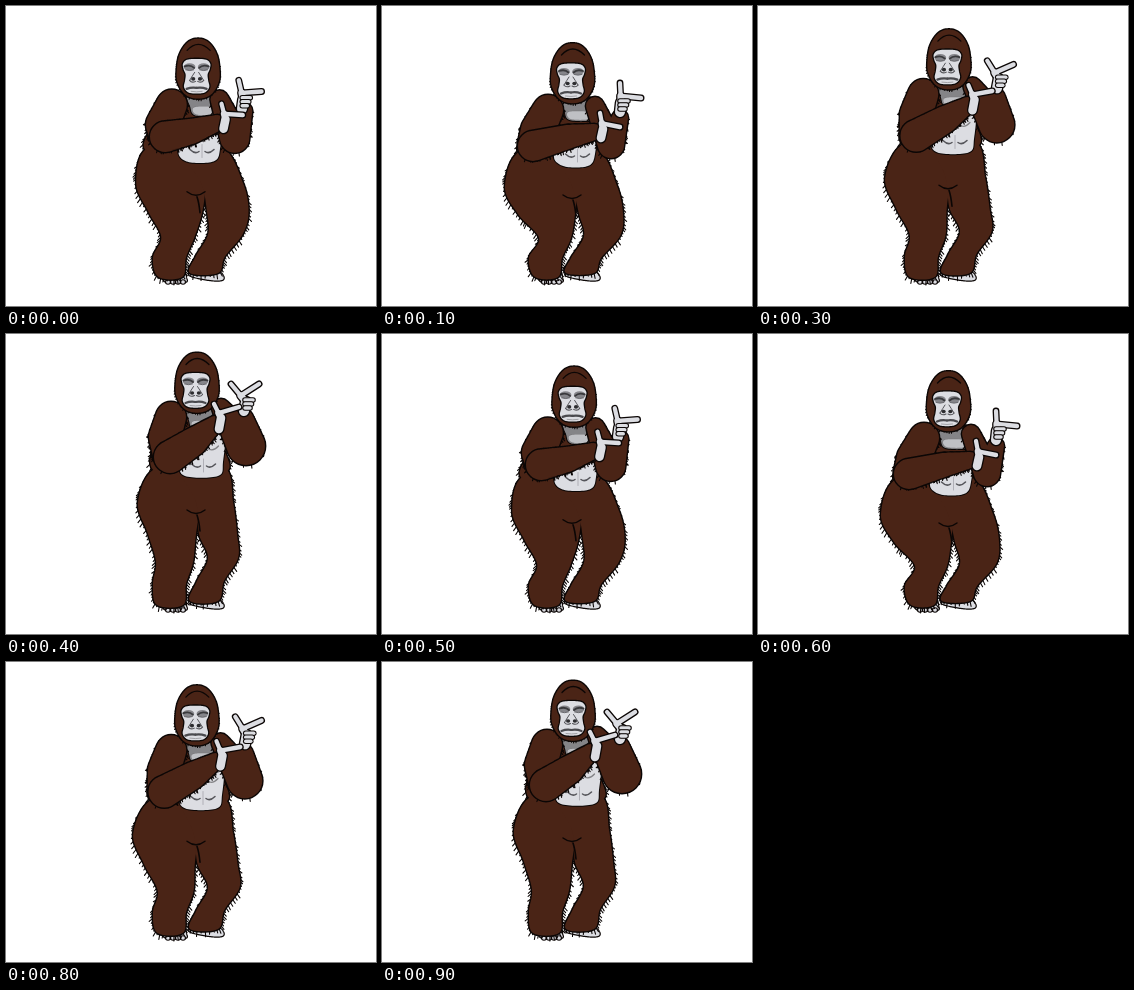
An HTML page with a canvas that plays this animation: 370x300 px, repeating every 1000 ms.

```html
<!DOCTYPE html>
<html lang="en">
<head>
<meta charset="utf-8">
<title>Dancing gorilla</title>
<style>
html, body { margin: 0; width: 100%; height: 100%; overflow: hidden; background: #fff; }
canvas { display: block; }
</style>
</head>
<body>
<canvas id="stage" width="370" height="300"></canvas>
<script>
const ctx = document.getElementById('stage').getContext('2d');
const FUR = '#4a2416', SKIN = '#dcdde2', GRAY = '#848487', SHADE = '#55555a', INK = '#0b0605';
const STEP = 100;

// Every beat is a mix of a crouch and a stretch, plus a sideways sway of the hips and elbows.
const LIFT = [.25, 0, .5, .75, 1];
const SWAY = [1, 0, -1, -.5, 0];

// Trunk parts are spans [y, left, right]; arms are joints [x, y, radius].
const crouch = {
  torso: [[94, 172, 211], [118, 150, 214], [148, 139, 216]],
  legL: [[144, 140, 200], [180, 123, 196], [208, 136, 193], [232, 157, 189], [252, 147, 180], [271, 153, 176]],
  legR: [[144, 175, 216], [180, 190, 235], [208, 197, 241], [230, 202, 238], [252, 189, 219], [267, 184, 212]],
  chest: [[125, 190, 212], [148, 172, 213], [160, 181, 206]],
  upper: [[166, 104, 15], [156, 124, 17], [152, 138, 16]],
  fore: [[151, 140, 15], [185, 131, 12], [212, 126, 8]],
  far: [[213, 100, 9], [229, 139, 13], [238, 112, 8]],
  hand: [[221, 123], [219, 132], [218, 107], [238, 121]],
  fist: [[239, 97], [238, 106], [238, 77], [259, 92]]
};
const stretch = {
  torso: [[72, 172, 210], [104, 151, 213], [138, 150, 220]],
  legL: [[134, 150, 200], [168, 132, 195], [200, 142, 190], [228, 150, 187], [250, 147, 180], [271, 151, 177]],
  legR: [[134, 175, 219], [168, 190, 227], [200, 193, 231], [224, 202, 232], [247, 191, 218], [267, 184, 212]],
  chest: [[95, 190, 217], [128, 175, 217], [142, 179, 212]],
  upper: [[165, 83, 15], [159, 103, 16], [163, 120, 16]],
  fore: [[164, 123, 16], [187, 108, 14], [209, 90, 8]],
  far: [[215, 74, 9], [240, 112, 19], [239, 84, 8]],
  hand: [[215, 84], [213, 95], [208, 70], [233, 73]],
  fist: [[240, 68], [238, 77], [225, 50], [253, 50]]
};

const mix = (a, b, k) => Array.isArray(a) ? a.map((v, i) => mix(v, b[i], k)) : a + (b - a) * k;
const noise = n => { const s = Math.sin(n * 127.1 + 3.7) * 43758.5453; return s - Math.floor(s); };

// Closed Catmull-Rom outline through a few points.
function smooth(p) {
  const n = p.length, out = [];
  for (let i = 0; i < n; i++) {
    const [a, b, c, d] = [n - 1, 0, 1, 2].map(o => p[(i + o) % n]);
    for (let t = 0; t < 1; t += 1 / 16)
      out.push([0, 1].map(j => b[j] + .5 * t * (c[j] - a[j] + t * (2 * a[j] - 5 * b[j] + 4 * c[j] - d[j]
        + t * (3 * (b[j] - c[j]) + d[j] - a[j])))));
  }
  return out;
}

// Both builders return a path and hair roots [x, y, normal x, normal y].
function spans(rows) {
  const left = rows.map(([y, l]) => [l, y]), right = rows.map(([y, , r]) => [r, y]).reverse();
  const pts = smooth([...left, ...right]), path = new Path2D(), roots = [];
  let walked = 0;
  pts.forEach(([x, y], i) => {
    path.lineTo(x, y);
    const [u, v] = pts[(i + 1) % pts.length], len = Math.hypot(u - x, v - y);
    walked += len;
    if (walked > 2.2) {
      walked = 0;
      roots.push([x, y, (y - v) / len, (u - x) / len]);
    }
  });
  path.closePath();
  return { path, roots };
}

function tube(joints) {
  const path = new Path2D(), roots = [];
  for (let i = 0; i < joints.length - 1; i++)
    for (let t = 0; t <= 1; t += 1 / 24) {
      const [x, y, r] = mix(joints[i], joints[i + 1], t);
      path.moveTo(x + r, y);
      path.arc(x, y, r, 0, 7);
      for (let j = 0; j < 5; j++) {
        const a = noise(roots.length + 9) * Math.PI * 2;
        roots.push([x + r * Math.cos(a), y + r * Math.sin(a), Math.cos(a), Math.sin(a)]);
      }
    }
  return { path, roots };
}

function paint(parts, fill, width) {
  ctx.strokeStyle = INK;
  ctx.lineWidth = width;
  parts.forEach(p => ctx.stroke(p.path));
  ctx.fillStyle = fill;
  parts.forEach(p => ctx.fill(p.path));
}

// Hairs first, so that the joined silhouette covers all inner ones.
function furry(parts, size) {
  ctx.beginPath();
  for (const { roots } of parts)
    roots.forEach(([x, y, nx, ny], i) => {
      const s = size * (.3 + .8 * noise(i));
      ctx.moveTo(x, y);
      ctx.lineTo(x + nx * s * .75 + (noise(i + 50) - .5), y + (ny * .5 + .7) * s);
    });
  ctx.strokeStyle = INK;
  ctx.lineWidth = 1.1;
  ctx.stroke();
  paint(parts, FUR, 2.8);
}

function line(pts, width = 1.2, color = INK) {
  const [a, b, c] = pts;
  ctx.beginPath();
  ctx.moveTo(...a);
  if (c) ctx.quadraticCurveTo(...b, ...c);
  else ctx.lineTo(...b);
  ctx.lineWidth = width;
  ctx.strokeStyle = color;
  ctx.stroke();
}

function oval(x, y, rx, ry, fill) {
  ctx.beginPath();
  ctx.ellipse(x, y, rx, ry, 0, 0, 7);
  ctx.fillStyle = fill;
  ctx.fill();
}

function drawFeet() {
  paint([spans([[267, 157, 177], [272, 157, 180], [276, 161, 179]])], SKIN, 2.4);
  for (let i = 0; i < 4; i++) {
    oval(162 + i * 5, 276, 3, 2.8, INK);
    oval(162 + i * 5, 276, 1.9, 1.8, SKIN);
  }
  paint([spans([[266, 187, 211], [270, 185, 217], [274, 204, 216]])], SKIN, 2.4);
}

function drawChest(rows) {
  paint([spans(rows)], SKIN, 2);
  const [bottom, l, r] = rows[2], x = (l + r) / 2 + 2, y = bottom - 12;
  for (const s of [-1, 1]) {
    line([[x + s * 3, y + 2], [x + s * 7, y + 5], [x + s * 12, y]], 1.5, SHADE);
    line([[x + s * 2, y - 17], [x + s * 9, y - 11], [x + s * 15, y - 18]], 1.2, GRAY);
  }
  line([[x, y - 5], [x, y + 8]], .8, '#a5a5ac');
}

function drawNeck() {
  paint([spans([[88, 182, 206], [100, 184, 209], [109, 189, 211]])], GRAY, 2);
  paint([spans([[101, 188, 207], [108, 190, 209]])], '#bfc0c4', 0.1);
}

const mirror = (cx, rows) => spans(rows.map(([y, w]) => [y, cx - w, cx + w]));

function drawHead() {
  furry([mirror(192, [[33, 5], [38, 12.5], [48, 18.5], [60, 21], [74, 21], [86, 15], [91.5, 6]])], 1.8);
  line([[181, 44], [192, 32], [204, 44]], 1.3);
  paint([mirror(190.5, [[53, 8], [57, 13.5], [63, 13], [68, 11], [74, 11.5], [81, 12.5], [86.5, 7]])], SKIN, 2.6);
  for (const s of [-1, 1]) {
    const at = (x, y) => [190.5 + s * x, y];
    oval(...at(7, 60.5), 5.8, 3.6, '#85858a');
    line([at(2.5, 61.5), at(6, 58), at(12, 60)], 1.8, '#39393c');
    line([at(3, 63.5), at(7, 65), at(11, 63.5)], .8, SHADE);
    line([at(2, 66), at(4, 69), at(7, 74)], 1, SHADE);
    line([at(7, 74), at(5, 77), at(1, 75)], 1.1, SHADE);
    oval(...at(3.4, 72.5), 2.1, 1.8, '#2c2c2f');
    line([at(0, 81.5), at(5, 80.5), at(10, 82.5)], 2.2, '#4a4a4e');
  }
  line([[185, 85], [190.5, 86], [196, 85]], .9, '#9b9ba0');
}

function drawHand([palm, heel, thumb, index], bulk) {
  const strokes = [[palm, heel, bulk], [mix(palm, thumb, .1), thumb, 4.2],
    [palm, mix(palm, thumb, .35), 6.5], [mix(palm, thumb, .35), index, 4.4]];
  for (const [rim, color] of [[2.6, INK], [0, SKIN]])
    for (const [a, b, w] of strokes) line([a, b], w + rim, color);
}

// Curled fingers: short capsules stacked below the index.
function drawCurl([x, y]) {
  for (let i = 0; i < 3; i++) {
    const a = [x - 1, y - 2 + i * 4], b = [x + 7 - i * 1.5, y - 2 + i * 4];
    line([a, b], 5.6, INK);
    line([a, b], 3.5, SKIN);
  }
}

function draw(beat) {
  const lift = LIFT[beat], sway = SWAY[beat], p = {};
  for (const name in crouch) p[name] = mix(crouch[name], stretch[name], lift);

  for (const leg of [p.legL, p.legR])
    for (let i = 1; i < 3; i++) { leg[i][1] += 5 * sway; leg[i][2] += 4 * sway; }
  const shift = (q, x, y) => { q[0] += x * sway; q[1] += y * sway; };
  shift(p.upper[2], 5, -4);
  shift(p.fore[0], 5, -5);
  shift(p.far[1], -3, 0);
  p.fist.forEach(q => shift(q, -2, 4));

  ctx.fillStyle = '#fff';
  ctx.fillRect(0, 0, 370, 300);
  drawFeet();
  furry([spans(p.torso), spans(p.legL), spans(p.legR)], 4.6);
  const cy = mix(194, 181, lift);
  line([[181, cy - 5], [190, cy + 2], [199, cy - 5]], 1.4);
  line([[191, cy], [193, cy + 6], [194, cy + 16]], 1.6);

  drawChest(p.chest);
  const nod = [mix(-1.5, -1, lift) + Math.max(0, sway) * 1.5, mix(5, -13.5, lift)];
  const withNod = f => { ctx.save(); ctx.translate(...nod); f(); ctx.restore(); };
  withNod(drawNeck);
  furry([tube(p.far)], 3.6);
  furry([tube(p.upper)], 3.4);
  furry([tube(p.fore)], 3.4);
  withNod(drawHead);
  drawHand(p.fist, 10);
  drawCurl(p.fist[0]);
  drawHand(p.hand, 8.5);
}

ctx.lineCap = ctx.lineJoin = 'round';
let shown = -1;
function tick() {
  const beat = Math.floor(performance.now() / STEP) % LIFT.length;
  if (beat !== shown) draw(shown = beat);
  requestAnimationFrame(tick);
}
tick();
</script>
</body>
</html>
```
